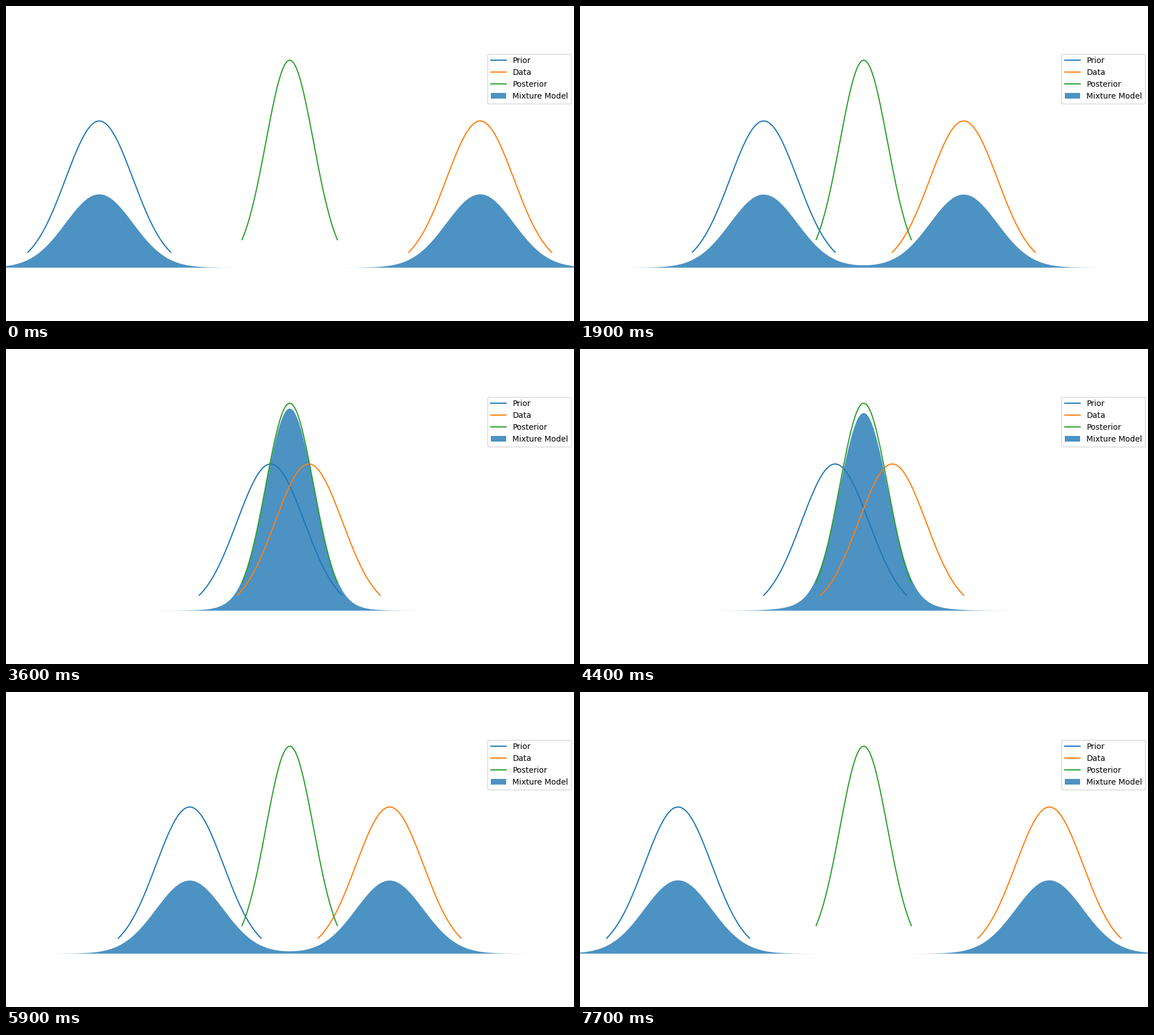
A matplotlib script for the animation above (7.8 s loop, 1004x558 px).

```python
import numpy as np
import matplotlib.pyplot as plt
from matplotlib.animation import FuncAnimation

W, H, DPI = 1004, 558, 100
FRAMES, INTERVAL = 78, 100

# Plot area in pixels; it runs slightly past both sides of the stage
LEFT, TOP, WIDTH, HEIGHT = -3.4, 77.7, 1009.8, 404.2

SD = np.sqrt(0.5)
POST_SD = 0.5
BACKGROUND = 0.02  # evidence for "prior and data are unrelated"


def normal(x, mean, sd):
    return np.exp(-0.5 * ((x - mean) / sd) ** 2) / (sd * np.sqrt(2 * np.pi))


def offset(frame):
    """Distance of each bell from the centre: 4.0 in to 0.1 and back out."""
    return 4 - 0.1 * min(frame, FRAMES - frame)


def mixture(x, mu):
    """Posterior and separate bells, weighted by how well the two agree."""
    evidence = normal(2 * mu, 0, 1)
    w = evidence / (evidence + BACKGROUND)
    apart = 0.5 * (normal(x, -mu, SD) + normal(x, mu, SD))
    return w * normal(x, 0, POST_SD) + (1 - w) * apart


# The small margin keeps the pixel size from rounding down
fig = plt.figure(figsize=((W + 0.01) / DPI, (H + 0.01) / DPI), dpi=DPI,
                 facecolor="white")
ax = fig.add_axes([LEFT / W, 1 - (TOP + HEIGHT) / H, WIDTH / W, HEIGHT / H])
peak = normal(0, 0, POST_SD)
ax.set_xlim(-6, 6)
ax.set_ylim(-0.05 * peak, 1.05 * peak)
ax.axis("off")

xs = np.linspace(-6, 6, 1000)
bell_x = np.linspace(-1.5, 1.5, 200)
bell_y = normal(bell_x, 0, SD)
post_x = np.linspace(-1, 1, 200)

prior, = ax.plot([], [], color="C0", lw=1.5, label="Prior")
data, = ax.plot([], [], color="C1", lw=1.5, label="Data")
ax.plot(post_x, normal(post_x, 0, POST_SD), color="C2", lw=1.5,
        label="Posterior")
fill = ax.fill_between(xs, mixture(xs, offset(0)), color="C0", alpha=0.8,
                       lw=0, label="Mixture Model")
ax.legend(loc="upper right", fontsize=10)


def update(frame):
    mu = offset(frame)
    prior.set_data(bell_x - mu, bell_y)
    data.set_data(bell_x + mu, bell_y)
    top = np.column_stack([xs, mixture(xs, mu)])
    fill.set_verts([np.vstack([[xs[0], 0], top, [xs[-1], 0]])])
    return prior, data, fill


anim = FuncAnimation(fig, update, frames=FRAMES, interval=INTERVAL,
                     repeat=True, repeat_delay=0, blit=False)
plt.show()
```
